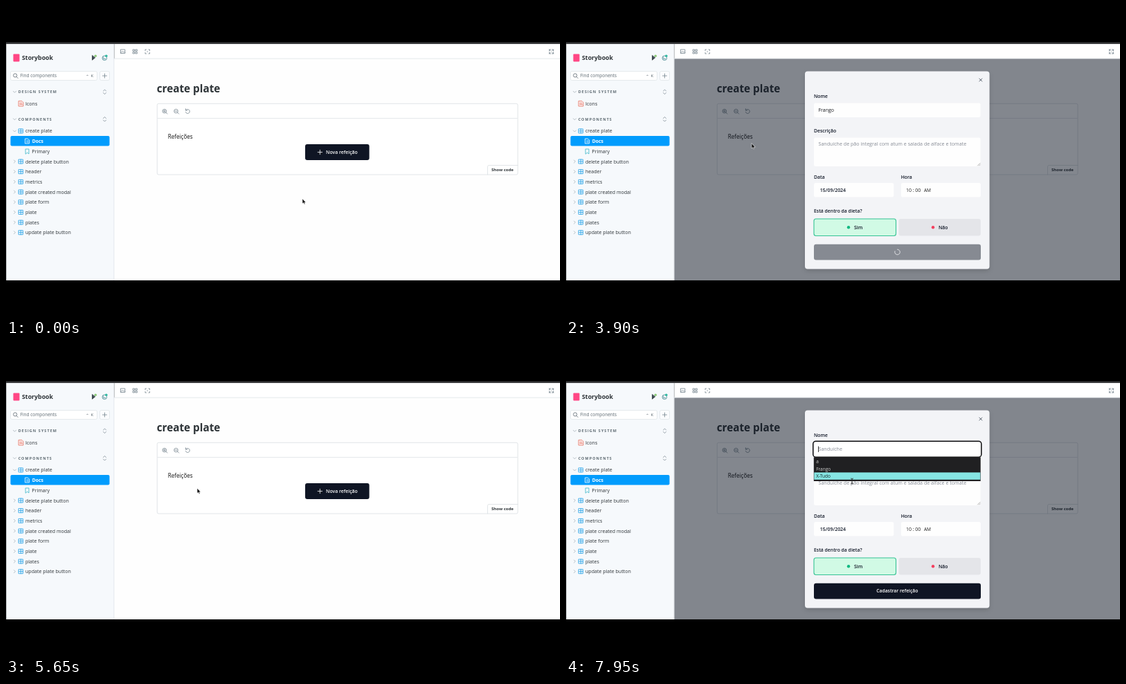
Write an HTML page that moves like this. It is 800x450 px and loops after 8000 ms.

```html
<!DOCTYPE html>
<html lang="pt">
<head>
<meta charset="utf-8">
<style>
html, body { margin: 0; width: 100%; height: 100%; overflow: hidden; background: #000; }
svg { display: block; width: 800px; height: 450px; font-family: "Open Sans", "Noto Sans", sans-serif; }
text { white-space: pre; }
</style>
</head>
<body>
<svg id="stage" viewBox="0 0 800 450"></svg>
<script>
const LOOP = 8000;
const INK = '#2e3438', DARK = '#0f1524', BLUE = '#1ea0e8', GREY = '#73828c';

const text = (x, y, s, size = 7.07, fill = INK, more = '') =>
  `<text x="${x}" y="${y}" font-size="${size}" fill="${fill}" ${more}>${s}</text>`;
const bold = (x, y, s, size = 6.85, fill = '#111827', more = '') =>
  text(x, y, s, size, fill, 'font-weight="600" ' + more);
const box = (x, y, w, h, fill, r = 0, more = '') =>
  `<rect x="${x}" y="${y}" width="${w}" height="${h}" rx="${r}" fill="${fill}" ${more}/>`;
const line = (d, color = GREY, w = .8, fill = 'none') =>
  `<path d="${d}" fill="${fill}" stroke="${color}" stroke-width="${w}" stroke-linecap="round" stroke-linejoin="round"/>`;
const dot = (x, y, r, fill, more = '') => `<circle cx="${x}" cy="${y}" r="${r}" fill="${fill}" ${more}/>`;
const group = (id, body) => `<g id="${id}">${body}</g>`;
const middle = 'text-anchor="middle"';

const chevron = (x, y, open) =>
  line(open ? `M${x - 2} ${y - 1}l2 2l2 -2` : `M${x - 1} ${y - 2}l2 2l-2 2`, '#9aa5ad', .7);
const gridIcon = (x, y, c) =>
  line(`M${x - 3} ${y - 3}h6v6h-6zM${x} ${y - 3}v6M${x - 3} ${y}h6`, c, .8);
const lens = (x, y, sign) =>
  line(`M${x + 1.9} ${y + 1.6}l2 2M${x - 1.6} ${y - .4}h2.8${sign ? `m-1.4 -1.4v2.8` : ''}`) +
  dot(x - .2, y - .4, 2.8, 'none', `stroke="${GREY}" stroke-width=".8"`);
const closeX = (x, y) => line(`M${x - 2} ${y - 2}l4 4m0 -4l-4 4`, '#4b5563', .9);

function heading(y, s) {
  return chevron(12.5, y, true) +
    text(17.7, y + 2, s, 5.4, '#5c6870', 'font-weight="700" letter-spacing="1.1"') +
    line(`M140.5 ${y - 1.3}l2 -2l2 2M140.5 ${y + 1.3}l2 2l2 -2`, '#7d8a93', .8);
}

function sidebar() {
  const rows = ['delete plate button', 'header', 'metrics', 'plate created modal',
    'plate form', 'plate', 'plates', 'update plate button'];
  return box(0, 55, 156, 342, '#f6f9fc') + box(0, 55, .7, 342, '#8d9093') +
    box(10.5, 69.5, 9, 11, '#ff4785', 1) +
    bold(23, 78.3, 'Storybook', 8.8, INK, 'style="font-weight:700"') +
    line('M124.5 71.8v6.4l4 -3.2z', '#3d4a50', .9, '#3d4a50') + dot(129.3, 72.3, 1.8, '#8bc97a') +
    dot(142.3, 75.3, 3.3, 'none', 'stroke="#4d8d95" stroke-width=".9"') + line('M140.8 74v2.5h3', '#4d8d95') +
    dot(144.8, 72.3, 1.8, '#2fb9a0') +
    box(6.5, 94.5, 125, 13, '#fff', 2, 'stroke="#dde2e6" stroke-width=".7"') +
    dot(13.2, 100.4, 2.6, 'none', 'stroke="#5c6870" stroke-width=".8"') + line('M15.2 102.5l2 2', '#5c6870') +
    text(20.5, 103.3, 'Find components', 6.5, '#5c6870') +
    text(115, 104, '⌃', 6, '#5c6870') + text(122.5, 103.1, 'K', 6, '#5c6870') +
    box(135.5, 94.5, 14, 13, '#fbfcfe', 2, 'stroke="#dde2e6" stroke-width=".7"') +
    line('M139.5 101h6m-3 -3v6') +
    heading(124.3, 'DESIGN SYSTEM') + heading(163.8, 'COMPONENTS') +
    line('M18.5 137.5h4.5l2 2v5.5h-6.5zM20 140.5h3M20 142.5h3.5', '#e8705f', .8, '#fbeeee') +
    text(28, 143.8, 'Icons') +
    chevron(12.5, 181, true) + gridIcon(21.5, 180.9, BLUE) + text(28, 183.4, 'create plate') +
    box(6.5, 188, 143, 14.6, '#029cfd', 2) +
    line('M28 192h3.5l2 2v5h-5.500zM29.700 195h2.300M29.700 197h2.300', '#fff', .8) +
    bold(37.7, 197.9, 'Docs', 6.9, '#fff', 'style="font-weight:700"') +
    line('M28.500 207h4.500v7l-2.250 -1.800l-2.250 1.800z', '#37b5c8', .8) + text(37.3, 212.9, 'Primary') +
    rows.map((s, i) => {
      const y = 225 + i * 14.68;
      return chevron(12.5, y, false) + gridIcon(21.5, y, BLUE) + text(28, y + 2.5, s);
    }).join('') +
    box(155.5, 55, .8, 342, '#dfe4e9');
}

function page() {
  return box(156, 76, 644, 321, '#fefefe') +
    bold(217.700, 124.700, 'create plate', 15.3, INK, 'style="font-weight:700"') +
    box(218.3, 141.3, 520.700, 102.700, '#fff', 2, 'stroke="#dadfe3" stroke-width=".8"') +
    box(218.700, 162, 520, .8, '#dfe3e7') +
    lens(229, 152.5, true) + lens(245.700, 152.5, false) +
    line('M260 150.5a3 3 0 1 1 -.6 3M259.400 148.700v2.400h2.400') +
    text(233.800, 192.300, 'Refeições', 8.05, '#111') +
    box(432, 200, 92.600, 23, DARK, 3) +
    line('M450.200 211.500h6.400m-3.200 -3.200v6.400', '#fff', .8) +
    bold(462, 214, 'Nova refeição', 6.9, '#fff') +
    line('M739 230.500h-41.500q-2 0 -2 2v11.500', '#dadfe3', .8) +
    bold(701, 239.200, 'Show code', 6.05, INK, 'style="font-weight:700"');
}

function toolbar() {
  return box(156.3, 55, 643.700, 21, '#fff') + box(156, 75.700, 644, .8, '#dfe3e8') +
    line('M165.800 63h6v5.500h-6zM166 67.500l2 -2l1.500 1.500l1 -1l1.300 1.300') +
    line('M183.500 63h2.200v2.200h-2.200zM187.200 63h2.200v2.200h-2.200zM183.500 66.700h2.200v2.200h-2.200zM187.200 66.700h2.200v2.200h-2.200z') +
    line('M201 64.500v-1.500h1.500M206 63h1.500v1.500M207.500 67.500v1.500h-1.500M202.500 69h-1.500v-1.500M203.800 66h.900') +
    line('M784.500 65v-2h2M788.500 63h2v2M790.500 67v2h-2M786.500 69h-2v-2M784.500 63l2 2M790.500 63l-2 2M790.500 69l-2 -2M784.500 69l2 -2');
}

function form() {
  const field = (x, y, w, h) => box(x, y, w, h, '#fefefe', 2.5);
  return box(345, 94.500, 266.500, 286, '#f3f4f7', 4, 'filter="url(#soft)"') + closeX(598.800, 107) +
    bold(358, 133, 'Nome') + field(358, 140.500, 240.500, 20.500) +
    bold(358, 183, 'Descrição') + field(358, 190.500, 240.500, 41.500) +
    text(364.500, 202.300, 'Sanduíche de pão integral com atum e salada de alface e tomate', 7.12, '#858a94') +
    line('M594.500 231l3.500 -3.500M596.700 231l1.300 -1.300', '#777', .6) +
    bold(358, 250.300, 'Data') + field(358, 256, 115.300, 20.500) + bold(366.700, 268.800, '15/09/2024', 7) +
    bold(483.700, 250.300, 'Hora') + field(483.900, 256, 115, 20.500) +
    text(491, 268.800, '10', 7, '#222') + text(500.800, 268.600, ':', 7, '#222') +
    text(504.200, 268.800, '00', 7, '#222') + text(517, 268.800, 'AM', 6.5, '#222') +
    bold(358, 298.800, 'Está dentro da dieta?') +
    box(358, 308, 118.500, 24.500, '#d1fae5', 3, 'stroke="#35c394" stroke-width="1.1"') +
    dot(408, 320.200, 2.200, '#10b981') + bold(416, 322.700, 'Sim') +
    box(480.500, 308, 118.300, 24.500, '#e4e5e9', 3) +
    dot(530, 320.200, 2.200, '#f43f5e') + bold(538, 322.700, 'Não') +
    `<g id="submit">${box(358, 344.800, 241, 22.700, DARK, 3)}</g>` +
    bold(478.300, 358.400, 'Cadastrar refeição', 6.8, '#fff', middle + ' id="label"') +
    group('spinner', line('M478.500 352.200a3.800 3.800 0 1 1 -3.600 2.600', '#e8e9ec', .9)) +
    group('ring', box(356.800, 139.200, 243, 23, '#fff', 4, 'stroke="#0b0b0d" stroke-width="1.5"')) +
    text(364.500, 153.300, 'Sanduíche', 7.12, '#858a94', 'id="hint"') +
    text(364.500, 153.300, 'Frango', 7, '#16181d', 'id="value"') +
    group('caret', box(364.200, 146.500, .8, 8.500, '#111')) +
    group('menu', box(357.800, 162.300, 240.900, 34.700, '#202022', .5) +
      box(358.300, 174, 240, 10.400, '#86e5e3', 0, 'id="pick"') +
      ['a', 'Frango', 'X-Tudo'].map((s, i) => text(361.200, 171.200 + i * 10.400, s, 6.5, '#ccc', 'class="opt"')).join(''));
}

function jumper() {
  const ink = '#202124', skin = '#f6f6f8';
  const limb = (d, w = 1) => line(d, ink, w, skin);
  return limb('M487 211Q478 217 464 209L453 199Q450 197 447 199L446 203Q449 207 453 207Q460 220 475 222L488 228Z') +
    limb('M508 211Q518 208 521 202L519 187L521 183L524 182L526 182L528 185L526 190Q530 202 527 208Q520 219 508 222Z') +
    limb('M487 239L465 265L450 236L440 242L459 281Q465 287 473 281L500 260Z') +
    limb('M487 238L512 238Q527 259 517 270L491 299L483 312L474 306L487 281L498 262') +
    limb('M426 235L446 227L451 237L442 243Q434 243 430 241Z') +
    line('M429 240L449 234', ink, .8) +
    limb('M473 304L484 311L480 327Q476 331 468 324Z') + line('M470 323L478 326L482 312', ink, .8) +
    limb('M487 211Q497 207 508 211Q511 224 511 238L487 238Q490 224 487 211Z') +
    line('M486 235Q499 239 512 234M489 237Q499 241 511 237', ink, .9) +
    line('M490 203Q488 193 496 192Q504 192 504 202Q506 207 507 208Q501 212 499 206Q497 199 494 199Z', ink, 1, ink) +
    limb('M491 200Q492 196 496 196Q500 198 500 204L500 210Q497 213 494 210V207Q490 206 491 200Z', .8) +
    line('M492.500 204Q494 206 496 204', ink, .6) + dot(493, 200.500, .5, ink) + dot(496.500, 200.500, .5, ink);
}

function success() {
  return box(379.700, 106, 197.300, 265.200, '#f3f4f7', 4, 'filter="url(#soft)"') + closeX(564, 118.700) +
    bold(478.400, 130.700, 'Continue assim!', 11, '#10b981', middle) +
    text(478.300, 150, 'Você continua <tspan font-weight="700">dentro da dieta</tspan>. Muito bem!', 6.85, '#6b7280', middle) +
    jumper() +
    box(408.700, 337.700, 139.200, 21, DARK, 3) +
    bold(478.300, 350.500, 'Continuar', 6.75, '#fff', middle);
}

const stage = document.getElementById('stage');
stage.innerHTML =
  '<filter id="soft"><feDropShadow dx="0" dy="3" stdDeviation="3" flood-opacity=".15"/></filter>' +
  box(0, 0, 800, 450, '#000') + box(0, 52.500, 800, 2.800, '#3b3c3e') +
  page() + group('shade', box(156.300, 76, 643.700, 321, '#09111e')) + toolbar() + sidebar() +
  group('form', form()) + group('done', success()) +
  group('arrow', line('M0 0V7L1.700 5.600L2.800 8L4 7.400L2.900 5.200H5Z', '#fff', .5, '#111')) +
  group('beam', line('M-1.500 -4Q0 -4 0 -3V3Q0 4 -1.500 4M1.500 -4Q0 -4 0 -3M0 3Q0 4 1.500 4', '#222', .8));

const el = id => document.getElementById(id);
const opts = [...document.querySelectorAll('.opt')];
const show = (id, on) => el(id).setAttribute('visibility', on ? 'inherit' : 'hidden');
const ramp = (t, a, b) => Math.min(1, Math.max(0, (t - a) / (b - a)));
const within = (t, spans) => spans.some(([a, b]) => t >= a && t < b);
const pulse = (t, a, b, c, d) => ramp(t, a, b) * (1 - ramp(t, c, d));

// time, x, y of the pointer's hot spot
const path = [[0, 428, 279], [50, 428, 279], [300, 464, 212], [600, 466, 204], [850, 466, 204],
  [1000, 466, 152], [1550, 466, 152], [2100, 398, 176], [2400, 398, 176], [3050, 448, 354],
  [3200, 448, 354], [3850, 268, 199], [4050, 268, 199], [4400, 268, 207.500], [5400, 268, 207.500],
  [5750, 278, 207.500], [6150, 466, 211], [6550, 466, 211], [6850, 413, 152], [7250, 413, 152],
  [7750, 413, 188], [7950, 413, 197], [8000, 413, 197]];

function pointer(t) {
  const i = path.findIndex(p => p[0] > t), [a, x, y] = path[i - 1], [b, u, v] = path[i];
  const k = ramp(t, a, b), e = k * k * (3 - 2 * k);
  return [x + (u - x) * e, y + (v - y) * e];
}

function modal(id, p) {
  const s = .95 + .05 * p;
  el(id).setAttribute('opacity', p);
  el(id).setAttribute('transform', `translate(478.300 238) scale(${id === 'form' ? s : 1}) translate(-478.300 -238)`);
  show(id, p > 0);
}

function draw(t) {
  const shade = pulse(t, 350, 550, 5320, 5520) + ramp(t, 6250, 6450);
  el('shade').setAttribute('opacity', shade * .5);
  modal('form', pulse(t, 350, 550, 4900, 5020) + ramp(t, 6250, 6450));
  modal('done', pulse(t, 4900, 5100, 5290, 5490));

  const [x, y] = pointer(t);
  const open = within(t, [[1550, 2450], [7250, LOOP]]);
  const filled = within(t, [[2450, 5100]]);
  const busy = within(t, [[3150, 5100]]);
  show('ring', within(t, [[1150, 3100], [7000, LOOP]]));
  show('caret', within(t, [[1150, 1550], [2050, 2300], [7000, 7250], [7750, LOOP]]));
  show('hint', !filled);
  show('value', filled);
  show('menu', open);
  const row = y < 163.500 ? -1 : Math.min(2, Math.floor((y - 163.500) / 10.400));
  show('pick', open && row >= 0);
  el('pick').setAttribute('y', 163.600 + Math.max(0, row) * 10.400);
  opts.forEach((o, i) => o.setAttribute('fill', i === row ? '#16292b' : '#ccc'));

  el('submit').setAttribute('opacity', busy ? .48 : 1);
  show('label', !busy);
  show('spinner', busy);
  el('spinner').setAttribute('transform', `rotate(${(t - 3900) * .36} 478.500 356)`);

  const beam = within(t, [[550, 1800], [6700, 7400], [7900, LOOP]]);
  show('beam', beam);
  show('arrow', !beam);
  el(beam ? 'beam' : 'arrow').setAttribute('transform', `translate(${x} ${y})`);
}

function tick() {
  draw(performance.now() % LOOP);
  requestAnimationFrame(tick);
}
tick();
</script>
</body>
</html>
```
